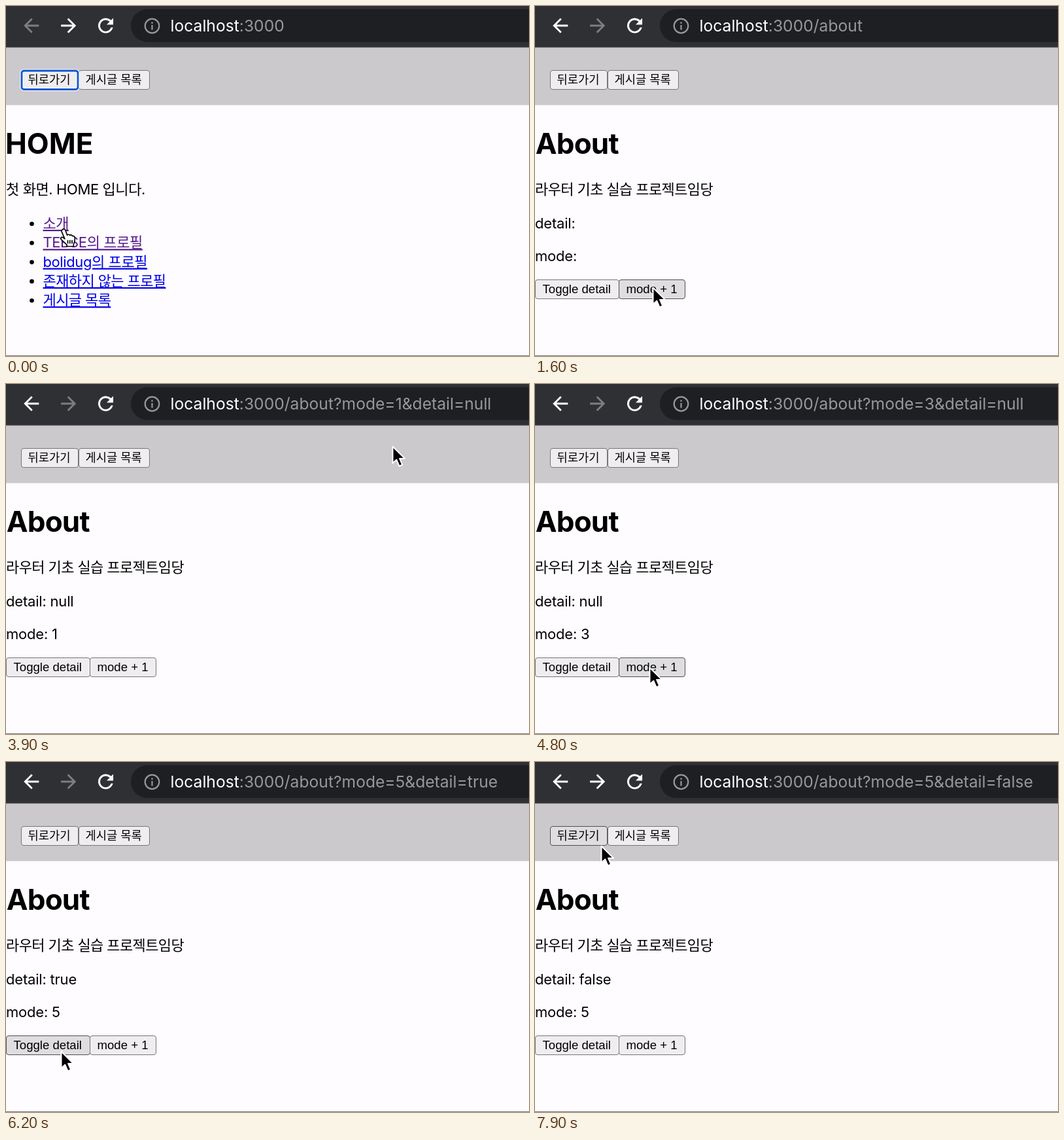
An HTML page that plays this animation: 800 px wide and 535 px high, repeating every 8000 ms.

```html
<!DOCTYPE html>
<html lang="ko">
<head>
<meta charset="utf-8">
<style>
html, body { margin: 0; width: 100%; height: 100%; overflow: hidden; background: #fefcff; }
svg { display: block; width: 800px; height: 535px; }
text { white-space: pre; }
.body { font: 22px Inter, 'Noto Sans CJK KR', sans-serif; letter-spacing: -.2px; }
.body .korean { letter-spacing: -.6px; }
.body .mixed { letter-spacing: -.4px; }
.title { font: bold 44px Inter, sans-serif; }
.url { font: 24.65px Inter, sans-serif; fill: #97989b; }
.link { fill: #0000e6; text-decoration: underline 1.6px; text-underline-offset: 2px; }
.visited { fill: #551a8b; }
.button rect { fill: #efedf0; stroke: #767578; }
.button.hover rect { fill: #dfdde0; stroke: #4f4e50; }
.button text { font: 17.7px 'Noto Sans CJK KR', sans-serif; }
.button .latin { font: 18.6px 'Liberation Sans', Arial, sans-serif; }
.icon { fill: none; stroke: #fff; stroke-width: 2; }
.icon.off { stroke: #7d7e81; }
.focus { fill: none; stroke: #fff; stroke-width: 5; }
.focus + .focus { stroke: #0b57d0; stroke-width: 2.8; }
</style>
</head>
<body>
<svg viewBox="0 0 800 535">
  <rect width="800" height="535" fill="#fefcff"/>
  <rect width="800" height="151.5" fill="#cbc9cc"/>
  <rect width="800" height="63.5" fill="#4a4b4e"/>
  <rect width="800" height="62.5" fill="#2f3034"/>
  <rect x="191" y="5" width="640" height="50" rx="25" fill="#1e1f22"/>
  <rect y="534" width="800" height="1" fill="#777678"/>

  <g transform="translate(21.500 12.700) scale(1.44)">
    <path id="back" class="icon" d="M20 12H5.500M12.700 4.700L5.400 12l7.300 7.300"/>
    <path id="forward" class="icon" d="M43.500 12H58M50.800 4.700L58.100 12l-7.300 7.300"/>
    <path fill="#fff" transform="translate(79)"
      d="M17.650 6.350A8 8 0 1 0 19.730 14H17.650A6 6 0 1 1 16.220 7.780L13 11H20V4Z"/>
  </g>
  <g fill="none" stroke="#97989b" stroke-width="2.2">
    <circle cx="223.500" cy="30.500" r="10.800"/>
    <path d="M223.500 29v7.500M223.500 24.500v2.500"/>
  </g>
  <text class="url" x="251.500" y="39"><tspan fill="#fff">localhost</tspan><tspan id="path"></tspan></text>

  <g id="navButtons"></g>

  <g id="home" class="body">
    <rect class="focus" x="24" y="99" width="86" height="28.500" rx="3.500"/>
    <rect class="focus" x="24" y="99" width="86" height="28.500" rx="3.500"/>
    <text class="title" x="-1" y="226" letter-spacing="0">HOME</text>
    <text class="mixed" x="0" y="288">첫 화면. HOME 입니다.</text>
    <g id="links"></g>
  </g>
  <g id="about" class="body">
    <text class="title" x=".7" y="226" style="letter-spacing:-.8px">About</text>
    <text class="korean" x="0" y="288">라우터 기초 실습 프로젝트임당</text>
    <text id="detail" x="0" y="340"></text>
    <text id="mode" x="0" y="390"></text>
    <g id="aboutButtons" letter-spacing="0"></g>
  </g>

  <g id="pointer">
    <path id="arrow" d="M.5 .5V26L6.300 20.700L10.500 30.500L15.300 28.500L11.100 18.900H19Z"
      stroke="#fff" stroke-width="2" stroke-linejoin="round"/>
    <g id="hand" transform="translate(1) scale(.93)" fill="#fff" stroke="#000" stroke-width="1.8" stroke-linejoin="round">
      <path d="M-2 1C0-1 2.500 0 3.300 2.500L6 10C7 8.500 9.500 8.500 10.300 10.200C12 9 14 9.700 14.500 11.500C16.500 10.800 18.500 12 18.700 14.500C19 19 18 22 16.500 25V28.500H5.500V26C3 23 0 21-3.500 17.500C-6 14.500-3.500 12-.5 14L2 16L-3 4.500C-3.500 3-3 1.800-2 1Z"/>
      <path d="M7 18v6M10.500 18v6M14 18v6"/>
    </g>
  </g>
</svg>
<script>
const el = id => document.getElementById(id);
const DURATION = 8000, STEP = 100;
const ABOUT_AT = 400, FIRST_CLICK = 1800, COUNT_FROM = 4300, CLICK_EVERY = 200, EXTRA_CLICK = 7000, BACK_AT = 7300;
const clamp = (v, low, high) => Math.min(high, Math.max(low, v));
const ease = k => k * k * (3 - 2 * k);

function makeButton(parent, x, y, width, label, kind, textX) {
  el(parent).insertAdjacentHTML('beforeend', `<g class="button">
    <rect x="${x + .5}" y="${y + .5}" width="${width - 1}" height="29" rx="3.5"/>
    <text class="${kind}" x="${x + textX}" y="${y + 21}">${label}</text></g>`);
  return { node: el(parent).lastElementChild, x, y, width };
}
const buttons = [
  makeButton('navButtons', 23, 98, 88, '뒤로가기', '', 10.5),
  makeButton('navButtons', 111, 98, 109, '게시글 목록', '', 10.5),
  makeButton('aboutButtons', 0, 418, 129, 'Toggle detail', 'latin', 11.5),
  makeButton('aboutButtons', 128, 418, 102, 'mode + 1', 'latin', 11.5)
];

[['소개', 'korean visited'], ['TEBSE의 프로필', 'mixed visited'], ['bolidug의 프로필', 'mixed'],
 ['존재하지 않는 프로필', 'korean'], ['게시글 목록', 'korean']].forEach(([label, kind], i) => {
  const y = 340 + i * 29.3;
  el('links').insertAdjacentHTML('beforeend',
    `<circle cx="39.5" cy="${y - 7}" r="3.3"/><text class="link ${kind}" x="56.5" y="${y}">${label}</text>`);
});

// Each move eases the pointer tip to a point; bend bows the path vertically.
const moves = [
  { start: 0, end: 0, x: 87, y: 341 },
  { start: 400, end: 900, x: 66, y: 418 },
  { start: 900, end: 1600, x: 180, y: 430, bend: -150 },
  { start: 2400, end: 2550, x: 60, y: 333 },
  { start: 2550, end: 2700, x: 180, y: 430 },
  { start: 3000, end: 3600, x: 718, y: 12 },
  { start: 3600, end: 3900, x: 591, y: 95 },
  { start: 3900, end: 4300, x: 175, y: 433 },
  { start: 5100, end: 5500, x: 84, y: 442, bend: 14 },
  { start: 6600, end: 6800, x: 154, y: 433 },
  { start: 7100, end: 7500, x: 585, y: 365 },
  { start: 7500, end: 7900, x: 101, y: 128, bend: -200 }
];

function pointerAt(t) {
  const i = moves.findLastIndex(move => move.start <= t);
  const to = moves[i], from = moves[i - 1] || to;
  const k = ease(clamp((t - to.start) / (to.end - to.start || 1), 0, 1));
  return {
    x: from.x + (to.x - from.x) * k,
    y: from.y + (to.y - from.y) * k + (to.bend || 0) * Math.sin(Math.PI * k)
  };
}

function queryAt(t) {
  if (t < FIRST_CLICK) return { mode: '', detail: '' };
  const clicks = clamp(Math.floor((t - COUNT_FROM) / CLICK_EVERY), 0, 4);
  const extra = t >= EXTRA_CLICK && t < BACK_AT ? 1 : 0;
  return { mode: 1 + clicks + extra, detail: t < 5900 ? 'null' : String(t < 6300) };
}

function render(t) {
  const isAbout = t >= ABOUT_AT;
  const { mode, detail } = queryAt(t);
  const { x, y } = pointerAt(t);

  for (const id of ['home', 'hand']) el(id).style.display = isAbout ? 'none' : '';
  for (const id of ['about', 'arrow']) el(id).style.display = isAbout ? '' : 'none';
  el('back').classList.toggle('off', !isAbout);
  el('forward').classList.toggle('off', isAbout && t < BACK_AT);

  el('path').textContent = ':3000' + (isAbout ? '/about' : '') + (mode ? `?mode=${mode}&detail=${detail}` : '');
  el('detail').textContent = 'detail: ' + detail;
  el('mode').textContent = 'mode: ' + mode;

  for (const b of buttons) {
    const inside = x >= b.x && x < b.x + b.width && y >= b.y && y < b.y + 30;
    b.node.classList.toggle('hover', inside);
  }
  el('pointer').setAttribute('transform', `translate(${x} ${y})`);
}

const start = performance.now();
function tick() {
  const t = (performance.now() - start) % DURATION;
  render(Math.floor(t / STEP) * STEP);
  requestAnimationFrame(tick);
}
tick();
</script>
</body>
</html>
```
